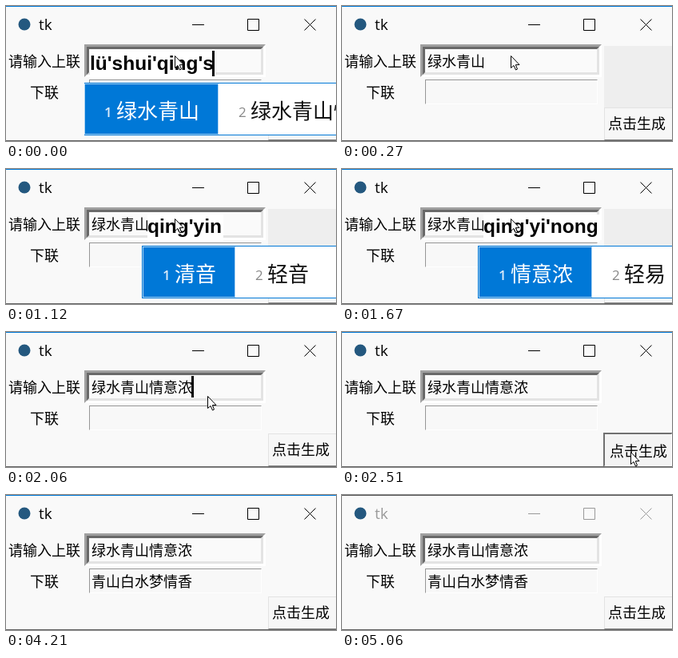
Recreate the animation shown at these times as an HTML page with a canvas. Size 413 by 169 pixels, loop 5100 ms.

```html
<!DOCTYPE html>
<html lang="zh">
<head>
<meta charset="utf-8">
<style>
html, body { margin: 0; width: 100%; height: 100%; overflow: hidden; background: #fff }
canvas { display: block }
</style>
</head>
<body>
<canvas id="stage" width="413" height="169"></canvas>
<script>
const LOOP = 5100;
const ctx = document.getElementById('stage').getContext('2d');
const CJK = '"Noto Sans CJK SC", "Noto Sans CJK", sans-serif';
const LATIN = '"Open Sans", sans-serif';
const BLUE = '#0078d7';
const PAPER = '#f9f9f9';

// start time, composed letters, candidates
const typing = [
  [0, "lü'shui'qing's", ['绿水青山', '绿水青山情']],
  [60, '', []],
  [420, 'q', ['去', '请', '前']],
  [500, 'qi', ['其', '起', '气']],
  [560, 'qin', ['请', '清', '青']],
  [650, 'qing', ['请', '清', '青']],
  [830, "qing'y", ['轻易', '情义']],
  [940, "qing'yi", ['轻易', '情义']],
  [1050, "qing'yin", ['清音', '轻音']],
  [1340, "qing'yi'no", ['情意浓', '轻易']],
  [1580, "qing'yi'non", ['情意浓', '轻易']],
  [1670, "qing'yi'nong", ['情意浓', '轻易']],
  [1780, '', []]
];

// time, x, y of the pointer tip
const pointerPath = [
  [0, 211, 62], [1910, 211, 62], [1970, 204, 49], [2270, 361, 150],
  [2780, 361, 150], [2970, 351, 93], [3860, 351, 93],
  [4020, 374, 118], [4210, 371, 171], [LOOP, 371, 171]
];

const caretOn = [[60, 270], [1780, 2450], [2780, 3350], [3650, 4210], [4510, 5060]];

const within = (t, a, b) => t >= a && t < b;

function rect(x, y, w, h, color) {
  ctx.fillStyle = color;
  ctx.fillRect(x, y, w, h);
}

function text(s, x, y, size, color = '#000', family = CJK, weight = 400) {
  ctx.font = `${weight} ${size}px ${family}`;
  ctx.fillStyle = color;
  ctx.fillText(s, x, y);
}

function shape(points, color) {
  ctx.beginPath();
  points.forEach(([x, y]) => ctx.lineTo(x, y));
  ctx.closePath();
  ctx.fillStyle = color;
  ctx.fill();
}

// Rectangle with a lit side and a shaded side, d pixels wide
function bevel(x, y, w, h, d, topLeft, bottomRight, fill) {
  rect(x, y, w, h, bottomRight);
  shape([[x, y], [x + w, y], [x + w - d, y + d], [x + d, y + d],
         [x + d, y + h - d], [x, y + h]], topLeft);
  rect(x + d, y + d, w - 2 * d, h - 2 * d, fill);
}

function titleBar(active) {
  const ink = active ? '#000' : '#999';
  rect(0, 0, 413, 1, active ? BLUE : '#555');
  ctx.beginPath();
  ctx.arc(23, 23, 7.5, 0, 7);
  ctx.fillStyle = '#24587f';
  ctx.fill();
  text('tk', 41, 30, 19, ink, LATIN);
  ctx.strokeStyle = ink;
  ctx.lineWidth = 1;
  ctx.beginPath();
  ctx.moveTo(233, 23.5);
  ctx.lineTo(248, 23.5);
  ctx.rect(302.5, 16.5, 14, 14);
  ctx.moveTo(373.5, 16.5);
  ctx.lineTo(387.5, 30.5);
  ctx.moveTo(387.5, 16.5);
  ctx.lineTo(373.5, 30.5);
  ctx.stroke();
}

function form(t) {
  if (within(t, 60, 1780)) rect(328, 50, 85, 77, '#eee');
  text('请输入上联', 3, 76, 18);
  text('下联', 30, 115, 18);

  bevel(98, 48, 227, 41, 3, '#a0a0a0', '#fff', '#fff');
  bevel(101, 51, 221, 35, 3, '#696969', '#e3e3e3', '#fafafa');
  if (t >= 60) text(t < 1780 ? '绿水青山' : '绿水青山情意浓', 107, 76, 18);
  if (caretOn.some(([a, b]) => within(t, a, b)))
    rect(t < 1780 ? 178 : 232, 55, 3, 27, '#000');

  bevel(104, 92, 216, 31, 1, '#969696', '#fff', '#f8f8f8');
  if (t >= 2780) text('青山白水梦情香', 107, 115, 18);

  const pressed = within(t, 2510, 2780);
  if (pressed) bevel(327, 126, 87, 43, 2, '#707070', '#fff', '#f3f3f3');
  else bevel(328, 127, 86, 41, 1, '#e3e3e3', '#8c8c8c', '#f7f7f7');
  text('点击生成', pressed ? 335 : 333, pressed ? 156 : 154, 18);
  rect(0, 168, 413, 1, '#666');
}

function inputMethod(t) {
  const [start, letters, words] = typing.filter(k => k[0] <= t).pop();
  if (!letters) return;
  const first = start === 0;
  const x = first ? 105 : 177;
  ctx.font = '700 24.5px "Liberation Sans", sans-serif';
  const w = ctx.measureText(letters).width;
  rect(x, 57, w + 2, 34, '#fff');
  text(letters, x, 80, 24.5, '#000', '"Liberation Sans", sans-serif', 700);
  if (first) rect(258, 56, 3, 32, '#000');

  let left = first ? 98 : 170;
  // The list reaches below the window while one syllable is typed
  if (within(t, 420, 830)) {
    rect(left, 162, 1, 7, BLUE);
    rect(left + 1, 162, 413, 7, '#fff');
  }
  rect(left, 96, 413, 66, BLUE);
  rect(left + 1, 97, 413, 64, '#fff');
  if (!first) left++;
  words.forEach((word, i) => {
    const width = 64 + 26 * word.length;
    if (!i) {
      rect(left, 97, width, 64, '#a9d2f3');
      rect(left + 1, 98, width - 2, 62, BLUE);
    }
    text(i + 1, left + 25, 139, 17, i ? '#888' : '#dcecfa', LATIN, i ? 400 : 600);
    text(word, left + 40, 141, 26, i ? '#111' : '#fff');
    left += width;
  });
}

function pointer(t) {
  const i = pointerPath.findIndex(k => k[0] > t);
  const [t0, x0, y0] = pointerPath[i - 1], [t1, x1, y1] = pointerPath[i];
  const u = (t - t0) / (t1 - t0);
  ctx.save();
  ctx.translate(Math.round(x0 + (x1 - x0) * u) + .5, Math.round(y0 + (y1 - y0) * u) + .5);
  shape([[0, 0], [0, 15], [3.5, 12], [6, 17.5], [8, 16.5], [5.8, 11.2], [10.5, 11]], '#fff');
  ctx.strokeStyle = '#000';
  ctx.lineWidth = 1;
  ctx.stroke();
  ctx.restore();
}

function draw() {
  const t = performance.now() % LOOP;
  rect(0, 0, 413, 169, PAPER);
  titleBar(t < 5060);
  form(t);
  inputMethod(t);
  pointer(t);
  requestAnimationFrame(draw);
}
draw();
</script>
</body>
</html>
```
